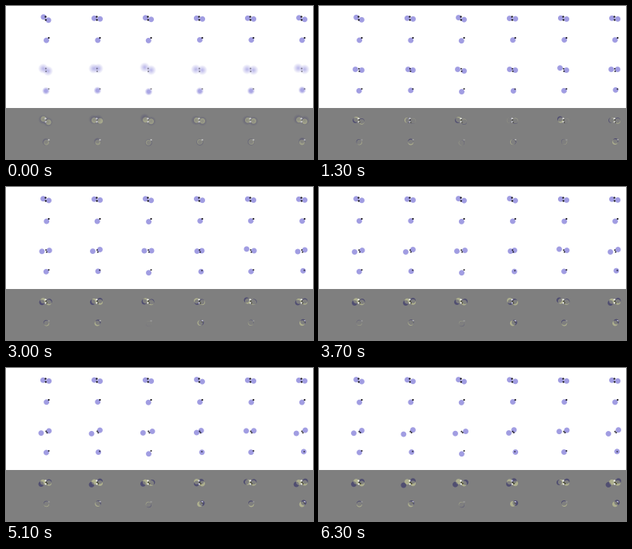
Animation, 384 px wide and 192 px high, one loop 6.4 s. Source, as a matplotlib script:

```python
import numpy as np
import matplotlib.pyplot as plt
from matplotlib.animation import FuncAnimation

W, H, CELL = 384, 192, 64
FRAMES, INTERVAL = 64, 100
LILAC = np.array([161, 157, 226]) / 255
INK = np.array([16, 14, 24]) / 255
RADIUS = 3.4

ys, xs = np.mgrid[0:CELL, 0:CELL]

# Vertical offset between the two paired balls, one row per column of cells
TILT_TIMES = [0, 13, 22, 37, 45, 56, 63]
TILT = [
    [4.0, 3.0, 2.4, 2.0, 1.2, 1.0, 2.5],
    [0.8, 1.0, 1.0, 1.2, 0.8, 2.0, 2.0],
    [2.0, 2.5, 1.5, 2.5, 1.0, 1.5, 2.5],
    [1.0, 0.5, 1.0, 2.5, 3.0, 2.2, 2.0],
    [1.0, 1.2, 1.5, 1.2, 1.5, 0.5, 1.0],
    [2.0, 1.0, 1.0, 1.0, 1.0, 0.5, 1.0],
]

# Predicted ball paths as (x, y) waypoints
PATH_TIMES = [0, 13, 22, 37, 63]
LEFT = [
    [(46, 14), (45, 15), (45, 15.5), (44, 17), (43, 17.3)],
    [(45, 14), (47, 15), (44, 15), (44, 17), (41.3, 18.6)],
    [(45, 12.5), (45, 15), (45, 15), (44, 16), (42, 17.7)],
    [(45, 15), (46, 15), (46, 16), (47, 16), (45, 17)],
    [(45, 15), (45, 13.3), (45, 13.2), (44, 13.5), (44, 15.2)],
    [(45, 13.5), (45, 15), (45, 16), (44, 17), (41.5, 18)],
]
RIGHT = [
    [(52, 17), (53, 16), (54, 15.2), (53.5, 15), (53, 14)],
    [(51, 14), (53, 16), (53, 14), (53, 14), (53, 13.2)],
    [(53, 16), (53, 17), (53, 16), (54, 15), (55, 15)],
    [(53, 16), (53, 16), (53, 16), (52, 15), (51.4, 13.2)],
    [(53, 16), (53, 16), (54, 16), (53.5, 15), (53.5, 13.6)],
    [(53, 15), (53, 15), (53, 15), (53.5, 14), (54, 13.2)],
]
LONE_START = [(49.5, 42), (50, 41.5), (50, 43), (50, 42.3), (50, 42), (50, 41)]
LONE_END = [(50, 41.5), (51.3, 41), (50, 43.3), (53.2, 41), (50, 41), (52.3, 40.3)]


def along(times, points, t):
    points = np.array(points, float)
    return [np.interp(t, times, axis) for axis in points.T]


def disc(img, x, y, r, color, soft=1.0, alpha=1.0):
    dist = np.hypot(xs - x, ys - y)
    cover = alpha * np.clip((r - dist) / soft + 0.5, 0, 1)[..., None]
    img[:] = img * (1 - cover) + color * cover


def true_cell(t, col):
    img = np.ones((CELL, CELL, 3))
    dy = np.interp(t, TILT_TIMES, TILT[col]) / 2
    dx = np.sqrt(3.7 ** 2 - dy ** 2)
    for side in (-1, 1):
        disc(img, 49.5 + side * dx, 15.3 + side * dy, RADIUS, LILAC)
    disc(img, 49, 13, 1.1, INK)
    disc(img, 49.2, 17, 1.1, INK)
    x = 50 + 0.35 * np.sin(0.5 * t + 2 * col)
    y = (43 if col == 2 else 42.3) + 0.3 * np.cos(0.4 * t + col)
    disc(img, x, y, RADIUS, LILAC)
    disc(img, 53, 39.5, 1.0, INK)
    return img


def predicted_cell(t, col):
    img = np.ones((CELL, CELL, 3))
    blur = np.exp(-t / 2.5)
    k = t / (FRAMES - 1)
    soft, alpha = 1 + 5 * blur, 1 - 0.3 * blur
    for path in (LEFT[col], RIGHT[col]):
        disc(img, *along(PATH_TIMES, path, t), RADIUS, LILAC, soft, alpha)
    ink = 0.85 - 0.4 * blur
    disc(img, 49.3 + 0.5 * k, 14 + 1.2 * k, 0.95, INK, alpha=ink)
    disc(img, 49.6 + 1.6 * k, 17.6 - k, 0.95, INK, alpha=ink)

    start, end = np.array(LONE_START[col]), np.array(LONE_END[col])
    x, y = start + (end - start) * k
    disc(img, x, y, RADIUS, LILAC, 1 + 2 * blur, 1 - 0.1 * blur)
    shift = np.clip((x - 50) / 2, 0, 1)
    disc(img, 53 - 0.5 * shift, 39.5 + shift, 0.95, INK, alpha=ink - 0.2 * shift)
    return img


def render(t):
    truth = np.hstack([true_cell(t, c) for c in range(6)])
    guess = np.hstack([predicted_cell(t, c) for c in range(6)])
    error = (guess - truth + 1) / 2
    return np.vstack([truth, guess, error])


fig = plt.figure(figsize=(W / 100, H / 100), dpi=100)
ax = fig.add_axes([0, 0, 1, 1])
ax.axis("off")
picture = ax.imshow(render(0), interpolation="nearest", aspect="auto")


def update(t):
    picture.set_data(render(t))
    return [picture]


anim = FuncAnimation(fig, update, frames=FRAMES, interval=INTERVAL,
                     repeat=True, repeat_delay=0, blit=False)
plt.show()
```
